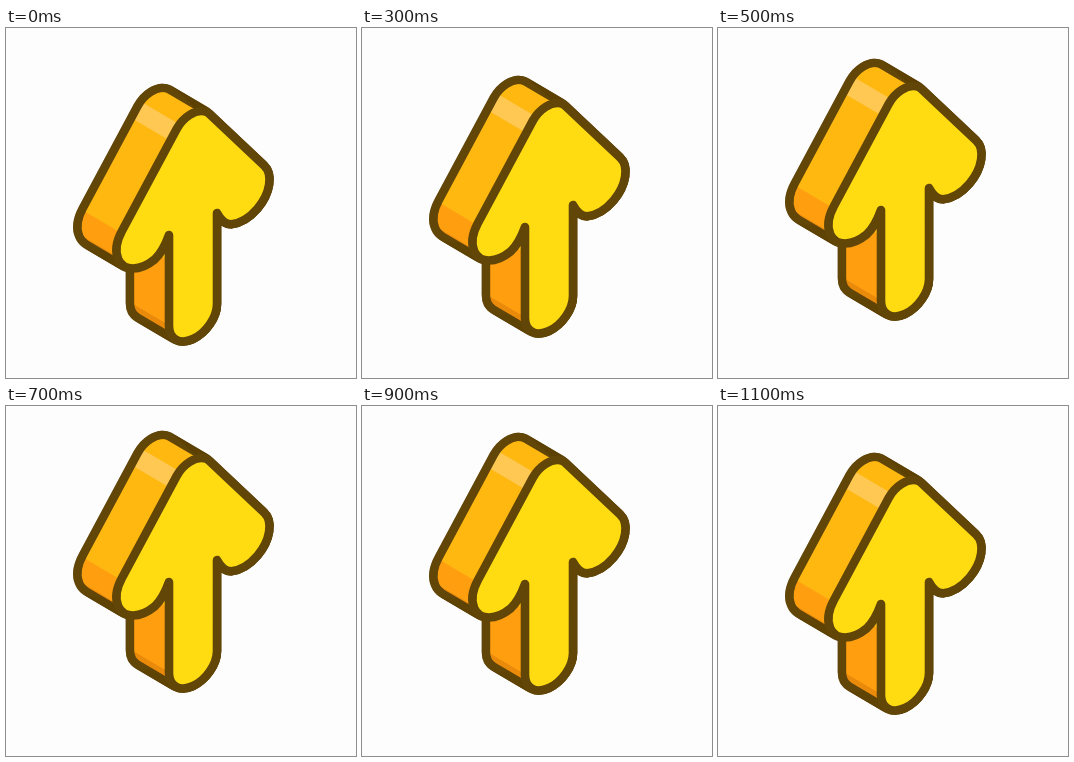
An HTML page with a canvas for the animation above (1.2 s loop, 350 by 350 pixels).

```html
<!DOCTYPE html>
<html>
<head>
<meta charset="utf-8">
<title>Floating arrow</title>
<style>
html, body { margin: 0; width: 100%; height: 100%; overflow: hidden; background: #fdfdfd; }
canvas { display: block; width: 350px; height: 350px; }
</style>
</head>
<body>
<canvas id="stage"></canvas>
<script>
const SIZE = 350, LOOP = 1200, STEP = 100;
const LINE = 8.6, BROWN = '#614608', FACE = '#ffdc12';
const SKEW = -0.46, CENTER = 187;
const DEPTH = { x: -39, y: -23 };
const LOW = 2, HIGH = -31.5;
const ratio = window.devicePixelRatio || 1;

function layer(canvas = document.createElement('canvas')) {
  canvas.width = canvas.height = SIZE * ratio;
  const ctx = canvas.getContext('2d');
  ctx.scale(ratio, ratio);
  ctx.lineWidth = LINE;
  ctx.lineJoin = 'round';
  return ctx;
}

function stamp(ctx, image, x = 0, y = 0) {
  ctx.drawImage(image.canvas, x, y, SIZE, SIZE);
}

// A symmetric rounded arrow, skewed onto the front plane
function arrowPath() {
  const p = new Path2D(), tilt = Math.atan(1 / 1.4), hook = 1.92;
  p.arc(0, 105, 20, Math.PI + tilt, 2 * Math.PI - tilt);
  p.arc(48, 187, 28.5, -tilt, hook);
  p.quadraticCurveTo(30, 210, 24, 196);
  p.arc(0, 287, 24, 0, Math.PI);
  p.lineTo(-24, 196);
  p.quadraticCurveTo(-30, 210, -38.3, 213.8);
  p.arc(-48, 187, 28.5, Math.PI - hook, Math.PI + tilt);
  p.closePath();
  const skewed = new Path2D();
  skewed.addPath(p, new DOMMatrix([1, SKEW, 0, 1, CENTER, 0]));
  return skewed;
}

// Repeats an image from the back plane to the front plane
function extrude(ctx, image) {
  const n = 78;
  for (let i = 0; i <= n; i++) stamp(ctx, image, DEPTH.x * i / n, DEPTH.y * i / n);
}

// Paints a strip running along the depth direction
function band(ctx, color, top, bottom, right = SIZE) {
  const drop = right * DEPTH.y / DEPTH.x;
  ctx.fillStyle = color;
  ctx.beginPath();
  ctx.moveTo(0, top);
  ctx.lineTo(right, top + drop);
  ctx.lineTo(right, bottom + drop);
  ctx.lineTo(0, bottom);
  ctx.fill();
}

function buildArrow() {
  const path = arrowPath();

  const outer = layer();
  outer.fillStyle = outer.strokeStyle = BROWN;
  outer.fill(path);
  outer.stroke(path);

  const inner = layer();
  inner.fillStyle = FACE;
  inner.fill(path);
  inner.globalCompositeOperation = 'destination-out';
  inner.stroke(path);

  const side = layer();
  extrude(side, inner);
  side.globalCompositeOperation = 'source-atop';
  band(side, '#ffb80f', -SIZE, SIZE);
  band(side, '#ffc853', -6, 16);
  band(side, '#ff9f10', 137, SIZE);
  band(side, '#ee8d0b', 163, 180, 118);
  band(side, '#e98a0a', 201, SIZE);

  const arrow = layer();
  extrude(arrow, outer);
  stamp(arrow, side);
  stamp(arrow, outer);
  stamp(arrow, inner);
  return arrow;
}

// Rises with a soft landing, rests, then sinks with a soft start and end
function lift(now) {
  const step = Math.floor((now % LOOP) / STEP) * STEP;
  const t = step < 200 ? LOOP : step;
  const rise = Math.min((t - 200) / 500, 1);
  const fall = Math.max((t - 820) / 460, 0);
  const height = Math.sin(rise * Math.PI / 2) - (1 - Math.cos(fall * Math.PI)) / 2;
  return LOW + (HIGH - LOW) * height;
}

const stage = layer(document.getElementById('stage'));
const arrow = buildArrow();
const start = performance.now();

function tick() {
  stage.fillStyle = '#fdfdfd';
  stage.fillRect(0, 0, SIZE, SIZE);
  stamp(stage, arrow, 0, Math.round(lift(performance.now() - start)));
  requestAnimationFrame(tick);
}
tick();
</script>
</body>
</html>
```
